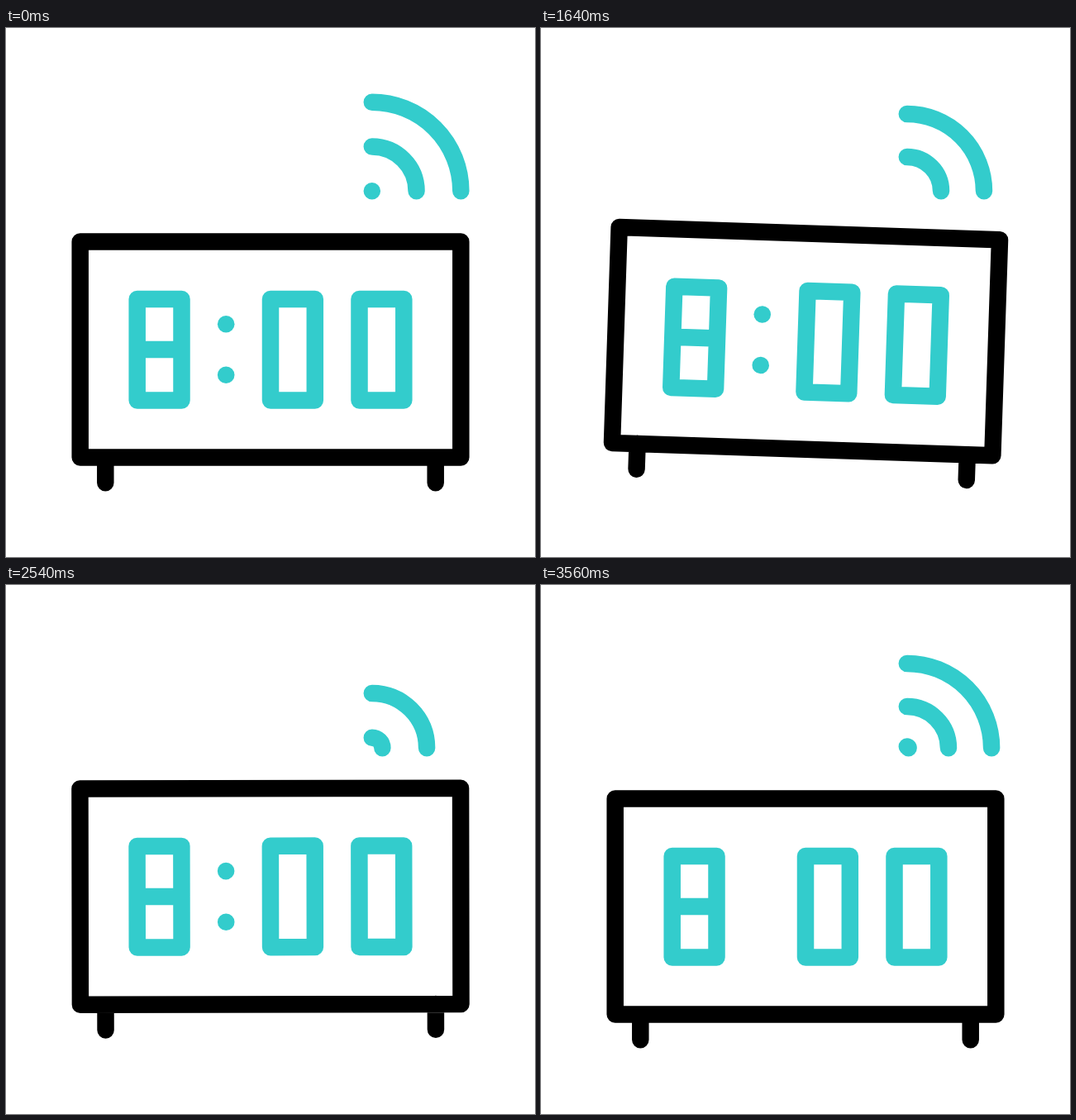
An HTML page with a canvas for the animation above (3580 ms loop, 640 by 640 pixels).

```html
<!DOCTYPE html>
<html>
<head>
<meta charset="utf-8">
<title>Smart clock</title>
<style>
  html, body { margin: 0; width: 100%; height: 100%; overflow: hidden; background: #fff; }
  canvas { display: block; }
</style>
</head>
<body>
<canvas id="stage" width="640" height="640"></canvas>
<script>
const ctx = document.getElementById('stage').getContext('2d');
const TEAL = '#33cccc', STEP = 20, STEPS = 179;
const PIVOT = { x: 320, y: 404.4 };

// Ripples in steps: [dot appears, reaches the middle ring, reaches the outer ring, last visible]
const ripples = [
  [-60, -30, 0, 0], [-30, 0, 30, 29], [0, 30, 60, 59],
  [30, 60, 90, 89], [59, 89, 120, 120], [89, 120, 150, 150],
  [120, 150, 181, 181], [150, 180, 210, 210], [177, 207, 237, 237]
];

// Shake: time of each listed swing; swings alternate right and left
const swingTimes = [60, 69.4, 96.9, 123.4, 144.4, 157.9, 164.6];
const swingIndex = [0, 1, 5, 9, 12, 14, 15];
const MAX_ANGLE = 2.2 * Math.PI / 180;

const eight = new Path2D('M158.7 327.9H212.5V450.4H158.7ZM158.7 389H212.5');
const seven = new Path2D('M158.7 327.9H213L212.5 450.4');
const five = new Path2D('M373.7 329H320.2V391H374.5L373.7 450.4H320');
const nine = new Path2D('M481.3 389H427.5V327.9H481.7L481.3 450.4H427.5');
const zeros = new Path2D('M320 327.9H373.8V450.4H320ZM427.5 327.9H481.3V450.4H427.5Z');
const frame = new Path2D('M89.7 258.4H550.3V519.6H89.7ZM120.3 519.6V550.3M519.7 519.6V550.3');

// Piecewise linear interpolation, clamped at both ends
function lerpKeys(x, xs, ys) {
  if (x <= xs[0]) return ys[0];
  for (let i = 1; i < xs.length; i++) {
    if (x < xs[i]) {
      return ys[i - 1] + (ys[i] - ys[i - 1]) * (x - xs[i - 1]) / (xs[i] - xs[i - 1]);
    }
  }
  return ys[ys.length - 1];
}

function swingAngle(step) {
  const k = lerpKeys(step, swingTimes, swingIndex);
  const wave = Math.cos(Math.PI * k);
  if (k < 1) return MAX_ANGLE * (1 - wave) / 2;
  if (k > 14) return -MAX_ANGLE * (1 + wave) / 2;
  return -MAX_ANGLE * wave;
}

function drawRipples(step) {
  ctx.strokeStyle = TEAL;
  for (const [start, mid, end, last] of ripples) {
    if (step < start || step > last) continue;
    const radius = lerpKeys(step, [start, mid, end], [0.02, 53.75, 107.5]);
    ctx.beginPath();
    ctx.arc(442.8, 197.2, radius, -Math.PI / 2, 0);
    ctx.stroke();
  }
}

function drawClock(step) {
  const lift = lerpKeys(step, [60, 87, 137.5, 164.6], [0, -12.2, -12.2, 0]);
  ctx.save();
  ctx.translate(PIVOT.x, PIVOT.y + lift);
  ctx.rotate(swingAngle(step));
  ctx.translate(-PIVOT.x, -PIVOT.y);

  ctx.strokeStyle = '#000';
  ctx.stroke(frame);

  ctx.strokeStyle = ctx.fillStyle = TEAL;
  const before = step > 0 && step < 60;
  for (const glyph of before ? [seven, five, nine] : [eight, zeros]) ctx.stroke(glyph);

  if (Math.floor(step / 30) % 2 === 0) {
    for (const y of [358.2, 419.8]) {
      ctx.beginPath();
      ctx.arc(266.2, y, 10.3, 0, 2 * Math.PI);
      ctx.fill();
    }
  }
  ctx.restore();
}

function draw(now) {
  const step = Math.floor(now / STEP) % STEPS;
  ctx.clearRect(0, 0, 640, 640);
  ctx.lineWidth = 20.5;
  ctx.lineCap = ctx.lineJoin = 'round';
  drawRipples(step);
  drawClock(step);
}

let origin;
function tick(now) {
  origin ??= now;
  draw(now - origin);
  requestAnimationFrame(tick);
}
draw(0);
requestAnimationFrame(tick);
</script>
</body>
</html>
```
